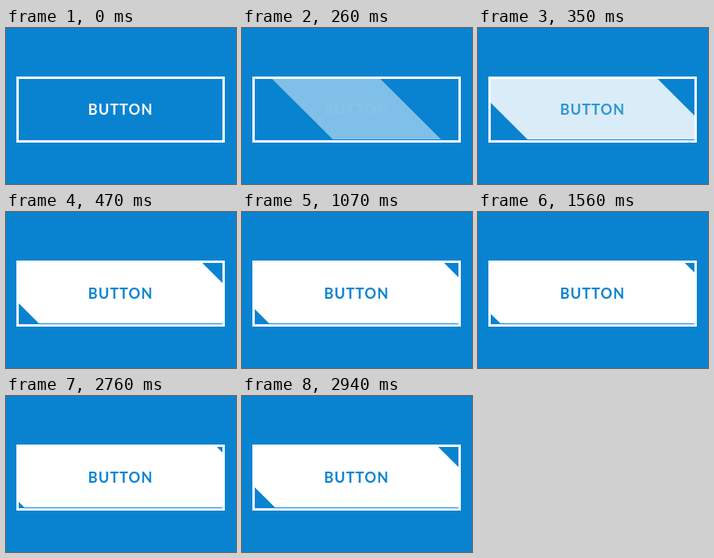
Animation, 288 px wide and 196 px high, one loop 3240 ms. Source, as an HTML page:

```html
<!DOCTYPE html>
<html lang="en">
<head>
<meta charset="utf-8">
<title>Button</title>
<style>
  html, body { margin: 0; width: 100%; height: 100%; overflow: hidden; background: #0983d0; }
  svg { display: block; }
  text { font: 700 18px Lato, sans-serif; letter-spacing: 1.1px; text-anchor: middle; }
</style>
</head>
<body>
<svg width="288" height="196" viewBox="0 0 288 196">
  <clipPath id="inside"><rect x="16" y="64" width="255" height="76"/></clipPath>
  <rect x="14.5" y="62.5" width="258" height="80" fill="none" stroke="#fff" stroke-width="3"/>
  <g clip-path="url(#inside)"><polygon id="cover" fill="#fff"/></g>
  <text id="label" x="143.5" y="109">BUTTON</text>
</svg>
<script>
const LOOP = 3240, STEP = 30, INNER = 255, CENTER = 143.5;
const REST = 0, HOVER = 1.1, PRESSED = 1.3;
const BLUE = [9, 131, 208];

// Cover width relative to the button; each move runs in discrete steps.
const moves = [
  { at: 230, steps: 9, to: HOVER },
  { at: 1070, steps: 2, to: PRESSED },
  { at: 1530, steps: 6, to: HOVER },
  { at: 2010, steps: 1, to: 1.11 },
  { at: 2270, steps: 2, to: PRESSED },
  { at: 2760, steps: 7, to: HOVER },
];

// The CSS "ease" curve, cubic-bezier(.25, .1, .25, 1).
function ease(x) {
  const bezier = (a, b, s) => 3 * a * s * (1 - s) ** 2 + 3 * b * s * s * (1 - s) + s ** 3;
  let low = 0, high = 1;
  for (let i = 0; i < 20; i++) {
    const mid = (low + high) / 2;
    if (bezier(.25, .25, mid) < x) low = mid; else high = mid;
  }
  return bezier(.1, 1, low);
}

function coverScale(time) {
  let scale = REST;
  for (const { at, steps, to } of moves) {
    if (time < at) break;
    const step = Math.floor((time - at) / STEP);
    const progress = step >= steps - 1 ? 1 : ease(.195 + .09 * step);
    scale += (to - scale) * progress;
  }
  return scale;
}

const cover = document.getElementById('cover');
const label = document.getElementById('label');

function draw(now) {
  const scale = coverScale(now % LOOP);
  const half = scale * INNER / 2, left = CENTER - half, right = CENTER + half;
  const hover = Math.min(scale / HOVER, 1);
  cover.setAttribute('points',
    `${left - 38},64 ${right - 38},64 ${right + 38},140 ${left + 38},140`);
  cover.setAttribute('opacity', hover);
  label.setAttribute('fill', `rgb(${BLUE.map(c => Math.round(255 + (c - 255) * hover))})`);
}

const start = performance.now();
function tick() {
  draw(performance.now() - start);
  requestAnimationFrame(tick);
}
tick();
</script>
</body>
</html>
```
